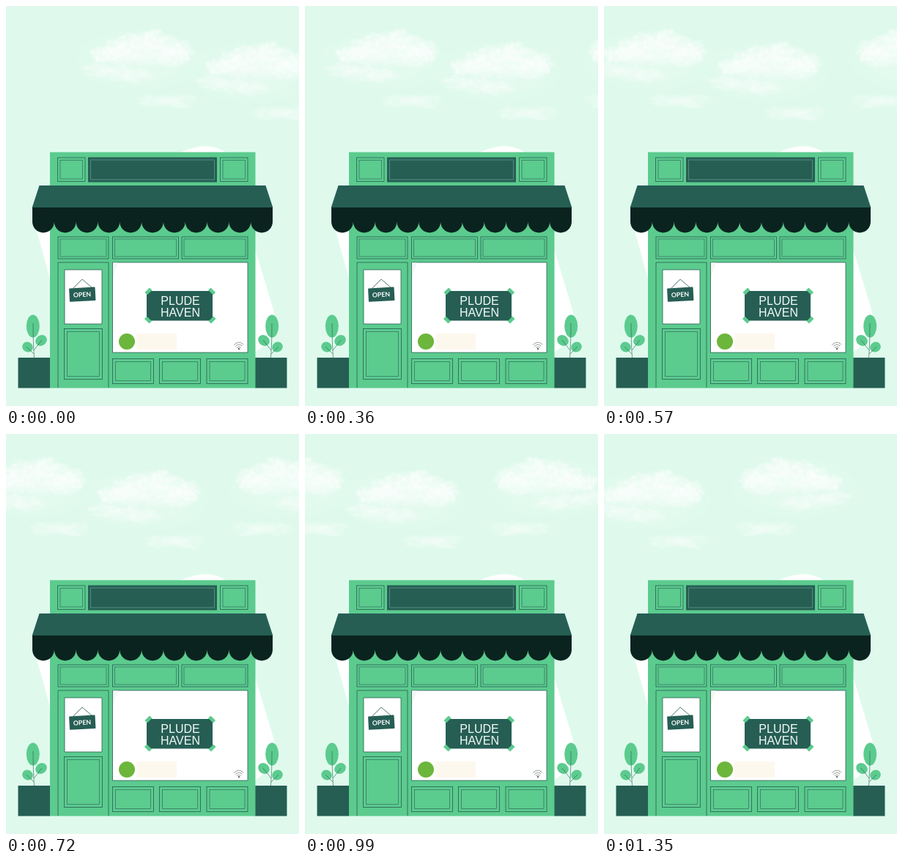
These frames come from a looping animation (400 by 546 pixels, 1.38 s). An HTML page with a canvas:

```html
<!DOCTYPE html>
<html lang="en">
<head>
<meta charset="utf-8">
<title>Shop front</title>
<style>
  html, body { margin: 0; width: 100%; height: 100%; overflow: hidden; background: #dffaed; }
  #stage { position: relative; width: 400px; height: 546px; overflow: hidden; }
  #sky, #shop { position: absolute; left: 0; top: 0; display: block; }
  .leaf { fill: #5ccb8e; }
  .dark { fill: #265e54; }
  .line { fill: none; stroke: #265e54; stroke-width: .8; }
  .thin { fill: none; stroke: #265e54; stroke-width: .6; }
  .pane { fill: #fff; stroke: #265e54; stroke-width: .8; }
  .sign { font: 16px "Liberation Sans", Arial, sans-serif; fill: #f4fbf8; text-anchor: middle; }
  .open { font: 700 8.8px Lato, sans-serif; fill: #fff; text-anchor: middle; }
</style>
</head>
<body>
<div id="stage">
  <canvas id="sky" width="720" height="200"></canvas>
  <svg id="shop" width="400" height="546" viewBox="0 0 400 546">
    <defs>
      <g id="plant">
        <ellipse class="leaf" cx="36.800" cy="437" rx="9" ry="15.500"/>
        <ellipse class="leaf" cx="48" cy="456.500" rx="8.300" ry="7" transform="rotate(-38 48 456.500)"/>
        <ellipse class="leaf" cx="29.500" cy="465.500" rx="7.500" ry="6.800" transform="rotate(35 29.500 465.500)"/>
        <path class="thin" d="M37 433Q37 460 38.500 480M38 470L49 456M38 475L28 465"/>
        <path class="dark" d="M16.500 480H60V521.500H16.500Z"/>
      </g>
    </defs>

    <path fill="#fff" d="M237 200Q257 191.300 272 191.300Q287 191.300 301 200ZM40 300L60 372V300ZM340 331L366 418Q369 445 353 463L340 473Z"/>
    <use href="#plant"/>
    <use href="#plant" transform="matrix(-1 0 0 1 400 0)"/>

    <path class="leaf" d="M60 199.500H340.500V521.500H60Z"/>
    <path class="dark" d="M112 206.500H288V240.500H112Z"/>
    <path fill="none" stroke="#5f9a8b" stroke-width=".8" d="M115.500 210H284.500V237H115.500Z"/>
    <g id="panels"></g>

    <path class="dark" d="M45.500 245H354.500L364.300 275H35.700Z"/>
    <g id="valance" fill="#0a231f"><path d="M36 275H364V295H36Z"/></g>

    <path class="line" d="M71 521V350H140V521"/>
    <path class="pane" d="M80 360H131V434H80Z"/>
    <path class="line" d="M92 385L104 373L117 384"/>
    <g transform="rotate(-3 104 393.500)">
      <rect class="dark" x="86.500" y="384.500" width="35.500" height="18.500" rx="1"/>
      <text class="open" x="104" y="397">OPEN</text>
    </g>

    <path class="pane" d="M145.500 350H330V473H145.500Z"/>
    <path fill="#f3f6f5" d="M146 350.500H153L146 371Z"/>
    <path fill="#fdf8ee" d="M178 447H233V469H178Z"/>
    <circle cx="165" cy="458" r="11" fill="#6cb63c"/>
    <path fill="none" stroke="#1d2f2b" stroke-width=".8" stroke-dasharray="1.300 .8" d="M311.500 462.500Q318 456 324.500 462.500M313.500 464.500Q318 460 322.500 464.500M315.500 466.500Q318 464 320.500 466.500"/>
    <circle cx="318" cy="468" r="1" fill="#1d2f2b"/>

    <g id="tapes" class="leaf"></g>
    <rect class="dark" x="192" y="389" width="90" height="40.500" rx="2"/>
    <use href="#tapes"/>
    <text class="sign" x="238" y="408">PLUDE</text>
    <text class="sign" x="238" y="423.500">HAVEN</text>
  </svg>
</div>
<script>
const byId = id => document.getElementById(id);

function add(parent, tag, attrs) {
  const el = document.createElementNS("http://www.w3.org/2000/svg", tag);
  for (const key in attrs) el.setAttribute(key, attrs[key]);
  parent.append(el);
}

// Framed panel: outer rectangle plus a thinner inset one.
function panel(x, y, width, height, inset) {
  const box = (d, cls) => add(byId("panels"), "rect", {
    x: x + d, y: y + d, width: width - 2 * d, height: height - 2 * d, class: cls
  });
  box(0, "line");
  box(inset, "thin");
}

for (const x of [70.5, 292.5]) panel(x, 207, 37.5, 32.5, 3.5);
for (const [x, w] of [[71, 69], [145.5, 90], [240, 90]]) panel(x, 315, w, 30, 3);
for (const x of [145.5, 209.5, 274]) panel(x, 481.5, 56, 34, 4);
panel(79.5, 440.5, 52, 69, 4);

const scallop = 328 / 11;
for (let i = 0; i < 11; i++) {
  add(byId("valance"), "circle", { cx: 36 + scallop * (i + .5), cy: 294.5, r: scallop / 2 });
}

for (const [x, y, turn] of [[194.5, 389.5, -45], [281, 389.5, 45], [194, 428.5, 45], [281.5, 428.5, -45]]) {
  add(byId("tapes"), "rect", {
    x: x - 4.5, y: y - 2.3, width: 9, height: 4.6, transform: `rotate(${turn} ${x} ${y})`
  });
}

// Clouds: one soft sprite, placed three times (the last one mirrored).
let seed = 7;
const rnd = () => (seed = seed * 16807 % 2147483647) / 2147483647;

function puff(g, x, y, rx, ry, alpha) {
  g.save();
  g.translate(x, y);
  g.scale(rx, ry);
  const fill = g.createRadialGradient(0, 0, 0, 0, 0, 1);
  fill.addColorStop(0, `rgba(255,255,255,${alpha})`);
  fill.addColorStop(.55, `rgba(255,255,255,${alpha * .65})`);
  fill.addColorStop(1, "rgba(255,255,255,0)");
  g.fillStyle = fill;
  g.fillRect(-1, -1, 2, 2);
  g.restore();
}

function mass(g, x, y, rx, ry, alpha, stretch) {
  puff(g, x, y, rx, ry, alpha);
  for (let i = 0; i < 34; i++) {
    const a = rnd() * Math.PI * 2, d = Math.sqrt(rnd()) * .88, r = 1.2 + rnd() * 3;
    puff(g, x + Math.cos(a) * d * rx, y + Math.sin(a) * d * ry, r * stretch, r, alpha * .55);
  }
}

const sprite = document.createElement("canvas");
sprite.width = 300;
sprite.height = 160;
const pen = sprite.getContext("2d");
puff(pen, 180, 74, 95, 46, .2);
for (const [x, y, rx, ry] of [
  [131, 66, 18, 13], [150, 58, 18, 16], [168, 51, 18, 16], [188, 49, 20, 17], [203, 45, 17, 16],
  [222, 55, 20, 17], [240, 61, 17, 16], [158, 68, 32, 14], [198, 66, 34, 19], [228, 70, 26, 16]
]) mass(pen, x, y, rx, ry, .46, 1.2);
for (const [x, y, rx, ry] of [
  [126, 87, 24, 11], [152, 93, 32, 12], [178, 95, 28, 11], [205, 129, 32, 10], [234, 130, 32, 11]
]) mass(pen, x, y, rx, ry, .24, 2.2);

const sky = byId("sky"), ctx = sky.getContext("2d");
ctx.drawImage(sprite, 0, 0);
ctx.drawImage(sprite, 157, 17);
ctx.setTransform(-1, 0, 0, 1, 717, 0);
ctx.drawImage(sprite, 0, 0);

sky.animate(
  [{ transform: "translateX(0)" }, { transform: "translateX(-282.5px)" }],
  { duration: 1380, iterations: Infinity, easing: "steps(46, end)" }
);
</script>
</body>
</html>
```
